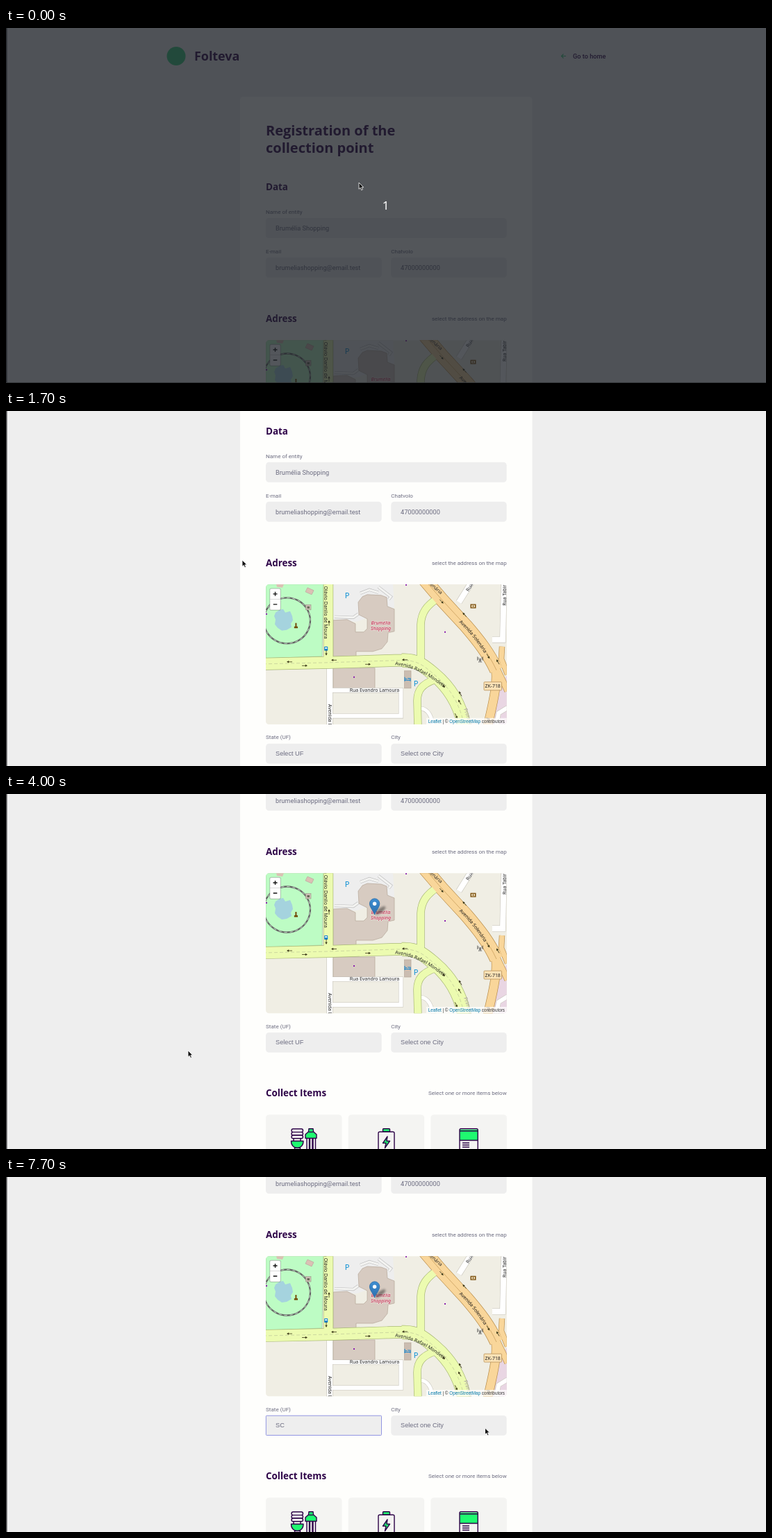
Animation, 1094 px wide and 512 px high, one loop 8 s. Source, as an HTML page:

```html
<!DOCTYPE html>
<html lang="en">
<head>
<meta charset="utf-8">
<title>Collection point form</title>
<style>
html, body { margin: 0; width: 100%; height: 100%; overflow: hidden; background: #eee; }
svg { display: block; width: 1094px; height: 512px; }
text { white-space: pre; }
.h { font-family: "Open Sans", "Noto Sans", sans-serif; font-weight: 700; fill: #2f0549; }
.b { font-family: Roboto, sans-serif; fill: #6c6c80; }
.s { font-family: "Liberation Sans", Arial, sans-serif; fill: #6c6c80; }
.m { font-family: "Noto Sans", sans-serif; fill: #222; font-size: 6.9px; }
</style>
</head>
<body>
<svg id="stage" viewBox="0 0 1094 512" xmlns="http://www.w3.org/2000/svg"></svg>
<script>
const LOOP = 8000, STEP = 100, ROW = 11.63, LIST_TOP = 110, LIST_MAX = 92.5;
const DARK = '#2d0248', GREEN = '#1ffa70';
const STATES = 'Select UF,RO,AC,AM,RR,PA,AP,TO,MA,PI,CE,RN,PB,PE,AL,SE,BA,MG,ES,RJ,SP,PR,SC,RS,MS,MT,GO,DF'.split(',');

// Keyframes: [ms, value...]
const SCROLL = [[700, 0], [1100, 88], [2100, 275], [2500, 336]];
const LIST = [[5200, 0], [5500, 36], [5600, 36], [6100, LIST_MAX]];
const CURSOR = [
  [0, 508, 223], [1000, 508, 224], [1300, 508, 224], [1700, 340, 215], [2100, 259.5, 202],
  [2300, 262, 200], [2500, 408, 193], [2600, 470, 173], [2700, 511, 163], [2800, 544, 165],
  [3000, 531, 175], [3500, 531, 175], [3700, 490, 215], [3900, 330, 325], [4000, 262, 370],
  [4100, 251, 378], [4200, 300, 374], [4400, 405, 357], [4900, 405, 355], [5000, 404.5, 327.5],
  [5100, 405, 303], [5200, 405, 303], [5400, 406, 328], [5600, 406, 322], [5900, 407, 312],
  [6400, 406, 300], [6600, 406, 298], [6700, 406, 279], [6800, 425, 290], [7000, 530, 345],
  [7200, 650, 382], [7400, 689, 387], [7700, 689.5, 362]
];

function at(keys, t) {
  if (t <= keys[0][0]) return keys[0].slice(1);
  for (let i = 1; i < keys.length; i++) {
    const a = keys[i - 1], b = keys[i];
    if (t <= b[0]) {
      const k = (t - a[0]) / (b[0] - a[0]);
      return a.slice(1).map((v, j) => v + (b[j + 1] - v) * k);
    }
  }
  return keys[keys.length - 1].slice(1);
}

const text = (c, x, y, size, s, more = '') =>
  `<text class="${c}" x="${x}" y="${y}" font-size="${size}" ${more}>${s}</text>`;
const rect = (x, y, w, h, fill, r = 0, more = '') =>
  `<rect x="${x}" y="${y}" width="${w}" height="${h}" rx="${r}" fill="${fill}" ${more}/>`;
const path = (d, fill, stroke = 'none', w = 1, more = '') =>
  `<path d="${d}" fill="${fill}" stroke="${stroke}" stroke-width="${w}" ${more}/>`;
const line = (d, stroke, w, more) => path(d, 'none', stroke, w, more);
const road = (d, w, fill, edge) => line(d, edge, w + 1.2) + line(d, fill, w);
const label = (x, y, deg, s, more = '') =>
  `<text class="m" transform="translate(${x} ${y}) rotate(${deg})" ${more}>${s}</text>`;
const arrow = (x, y, deg) => `<g transform="translate(${x} ${y}) rotate(${deg})">` +
  line('M-4 0H2', '#3b3818', 0.8) + path('M4 0L0.8 -1.7V1.7Z', '#3b3818') + '</g>';
const dot = (x, y) => rect(x - 1, y - 1, 2, 2, '#8a1fae');
const right = 'text-anchor="end"', mid = 'text-anchor="middle"';

function header() {
  return '<circle cx="245" cy="40.5" r="13.5" fill="#34cb79"/>' +
    text('h', 271, 47, 17.9, 'Folteva') +
    line('M806 40.5H799.5M802.5 37.5L799.5 40.5L802.5 43.5', '#34cb79', 1.1) +
    text('b', 816, 43.8, 9.2, 'Go to home', 'style="font-weight:500;fill:#2f0549"');
}

function form() {
  return rect(337, 99, 420.5, 1200, '#fefefc', 4.6) +
    text('h', 374, 155.3, 20, 'Registration of the') +
    text('h', 374, 179.6, 20, 'collection point') +
    text('h', 374, 233.8, 13.4, 'Data') +
    text('b', 374, 267.9, 8.05, 'Name of entity') +
    rect(374, 274, 346.7, 29, '#eee', 4.6) +
    text('b', 388, 292, 9.2, 'Brumélia Shopping') +
    text('b', 374, 324.9, 8.05, 'E-mail') +
    text('b', 554.3, 324.9, 8.05, 'Chatvolo') +
    rect(374, 331, 166.7, 29, '#eee', 4.6) + rect(554.3, 331, 166.4, 29, '#eee', 4.6) +
    text('b', 388, 349, 9.2, 'brumeliashopping@email.test') +
    text('b', 568, 349, 9.2, '47000000000') +
    text('h', 374, 423.9, 13.4, 'Adress') +
    text('b', 720.7, 422.3, 8.05, 'select the address on the map', right);
}

function park() {
  const ring = 'M404.5 133.5A33.5 33 0 1 1 404.4 133.5';
  return path('M374 114H457L455 218L374 221Z', '#bdfcc4', '#a5d6a0', 0.8) +
    path('M388 155L394 151L399 150L402 155L409 153L412 160L413 166L410 171L411 176L404 180L397 181L391 177L387 172L388 165L386 160Z', '#a5d3de') +
    line(ring, '#666', 2.3) + line(ring, '#d5eed8', 0.9, 'stroke-dasharray="4 4"') +
    path('M434 119L443 123L440 129L431 125Z', '#dbc1b4', '#b99', 0.6) +
    path('M389 114H400L398 119L390 118Z', '#dbc1b4') +
    rect(431.5, 143.5, 7.5, 7.5, '#cbbcb4', 0, 'stroke="#998" stroke-width=".6"') +
    rect(433.5, 146, 3.4, 3, '#665') +
    path('M416.4 170H418.4V175H420V177.5H414.8V175H416.4Z', '#734a08') + dot(375, 157);
}

function buildings() {
  const wall = '#d7cbc1', edge = '#b5a699';
  const lanes = 'M473 161L500 162L507 157M510 127L523 122L536 126M536 118L554 132L551 136';
  return path('M471 114H557L559 148L505 168H471Z', '#eee') +
    line(lanes, '#bbb', 4.2) + line(lanes, '#f3f3f1', 3) +
    path('M471 166L491 165L503 171V183H515L520 178V164L508 158L507 140L513 132L520 129L540 130L548 133L549 146L559 150V182L550 184L549 197L541 207L528 211H504V219H471Z', wall, edge, 0.7) +
    rect(471, 235, 60, 29, wall, 0, `stroke="${edge}" stroke-width=".7"`) +
    rect(573.5, 239, 9.5, 25, '#cbbdb1', 0, `stroke="${edge}" stroke-width=".7"`) +
    line('M574 248V254M574 252.5H582V254M575 250.5H577M578 250H582V252', '#1285d0', 1.1);
}

function roads() {
  const lime = '#ecfbb0', limeEdge = '#a9b877', sand = '#f9d69a', sandEdge = '#b98f4e', grey = '#c9c6bd';
  const west = 'M370 229L465 227L560 224L580 224', east = 'M570 224C592 223 602 232 616 244C640 264 654 288 660 320';
  const green = [['M464 228V110', 13], ['M597 224V172C598 155 605 145 622 134', 10],
    ['M593 320L592 282C592 266 600 258 616 252', 10], [west, 16.5], [east, 19]];
  const high = 'M598 102L627 136L662 174C680 195 695 214 706 238';
  const orange = [['M714 204L713 222L722 244', 7], ['M704 230L722 268', 8],
    ['M704 230C709 255 701 285 693 320', 12], [high, 18.5]];
  const layer = (list, color, extra) => list.map(([d, w]) => line(d, color, w + extra)).join('');
  return path('M721 246L706 262L703 295L697 318H721Z', '#e9d6e3') +
    road('M466 232V320', 8, '#fff', grey) +
    road('M470 267H568.5V304H470', 6, '#fff', grey) +
    road('M597 293C608 294 612 304 616 320', 5, '#fff', grey) +
    road('M672 108L652 140', 8, '#fff', grey) +
    road('M717 110L715 194H700', 8, '#fff', grey) +
    road('M722 292L709 300L706 318', 6, '#fff', grey) +
    layer(green, limeEdge, 1.4) + layer(orange, sandEdge, 1.4) +
    layer(green, lime, 0) + layer(orange, sand, 0) +
    line(west + east.replace('M', 'L'), '#c5ce9b', 0.8, 'stroke-dasharray="5 3"') +
    line(high, '#c9a05f', 0.8);
}

function mapLabels() {
  const P = (x, y) => text('m', x, y, 11, 'P', mid + ' style="font-size:11px;fill:#0b8fd4"');
  const shop = (y, s) => text('m', 539.5, y, 7, s,
    mid + ' font-style="italic" style="fill:#b8143c;stroke:#f3e8e4;stroke-width:1;paint-order:stroke"');
  return label(457.7, 111, 90, 'a Olávio Danilo de Moura') +
    label(463.7, 287, 90, 'Avenida Lomira') +
    label(719.5, 145, -90, 'Rua Tabir') + label(666, 125, -60, 'Rua Bel') +
    label(609, 114, 42, 'lenária') + label(659, 294, 72, 'Primora', 'style="fill:#a092a2"') +
    label(691, 307, 72, 'Av') +
    '<path id="p1" d="M560 230.5Q600 234 642 274" fill="none"/><path id="p2" d="M652 169C668 183 680 200 698 228" fill="none"/>' +
    '<text class="m"><textPath href="#p1">Avenida Rafael Mondetti</textPath></text>' +
    '<text class="m"><textPath href="#p2">Avenida Solenária</textPath></text>' +
    text('m', 530.5, 269, 7, 'Rua Evandro Lamoura', mid) +
    shop(172.5, 'Brumélia') + shop(180.5, 'Shopping') + P(491, 134) + P(590, 261) +
    rect(688, 255, 25.5, 12, '#fbe2b6', 1, 'stroke="#b99258" stroke-width=".8"') +
    text('m', 700.7, 263.6, 7, 'ZK-718', mid) +
    rect(668.5, 142.7, 8, 6, '#7b4f0d') + rect(670, 144, 5, 3.4, '#f3e6c8') + '<circle cx="672.5" cy="145.7" r="1.1" fill="#7b4f0d"/>' +
    line('M682.5 221V227M680.5 227L682.5 221L684.5 227M680 219.5V223M685 219.5V223M678.7 218.5V224M686.3 218.5V224', '#444', 0.7) +
    rect(458.2, 204, 5, 6, '#1285d0', 0.8) + rect(459.2, 205.2, 3, 1.8, '#fff') +
    [[408, 226, 180], [430, 231.5, 0], [472, 223.5, 180], [521, 229.5, 0], [574, 223, 180], [629, 260, 45],
      [654, 272, 240], [653, 284, 240], [648, 304, 65], [627, 139, 48], [660, 158, 228], [694, 218, 60],
      [708, 226, 240], [465, 170, 270], [461, 213, 90]].map(a => arrow(...a)).join('') +
    dot(576, 115) + dot(632, 183) + dot(501, 248);
}

function controls() {
  return rect(379.7, 120.3, 15.6, 31, '#fff', 2.2, 'stroke="#0003" stroke-width="1.2"') +
    rect(380, 135.3, 15, 0.7, '#ccc') +
    line('M384.5 128H390.5M387.5 125V131M384.7 143H390.3', '#111', 1.3) +
    rect(605, 307, 116, 9.3, '#ffffffb8') +
    text('s', 718, 313.8, 6.35, '<tspan fill="#0078a8">Leaflet</tspan> | © <tspan fill="#0078a8">OpenStreetMap</tspan> contributors', right + ' style="fill:#333"');
}

function pin() {
  return '<g id="pin"><ellipse cx="539" cy="168" rx="9" ry="3.2" transform="rotate(-38 539 168)" fill="#0006" filter="url(#blur)"/>' +
    path('M530.6 174C529 168.5 523.4 163.5 523.4 158A7.2 7.2 0 0 1 537.8 158C537.8 163.5 532.2 168.5 530.6 174Z', 'url(#blue)', '#2b6ca8', 0.8) +
    '<circle cx="530.6" cy="158.2" r="2.7" fill="#fff"/></g>';
}

function items() {
  const pale = '#f4f4f2', ink = `stroke="${DARK}" stroke-width="1.4"`;
  const card = x => rect(x, 462.5, 109.5, 104, pale, 4.6);
  const box = (x, y, w, h, fill, r) => rect(x, y, w, h, fill, r, ink);
  const shape = (d, fill) => path(d, fill, DARK, 1.4, 'stroke-linejoin="round"');
  const lamps = shape('M414 496H424V501H414Z', pale) +
    [483, 487.6, 492.2].map(y => box(411, y, 16.5, 4.6, pale, 2.3)).join('') +
    shape('M410.5 500.5H428C428 507 424 510 419.3 510.5C414.5 510 410.5 507 410.5 500.5Z', GREEN) +
    box(415.5, 510.5, 8, 6, pale, 0) +
    shape('M433 496V518H436.5V496M437.5 496V518H441V496M442 496V518H445.5V496', 'none') +
    shape('M435.5 487L436 482.7H442L442.5 487L447 491V496.5H431V491Z', GREEN) +
    shape('M435.5 487.5H442.5', 'none');
  const battery = box(542.5, 482.7, 10, 4.5, GREEN, 1) + box(536, 487.2, 23, 34, pale, 2) +
    shape('M549 494L542.5 503.5H547L545.5 510.5L552.5 500.5H548Z', GREEN);
  const can = path('M653 484H679V499.5H653Z', GREEN) + box(653, 482.8, 26.2, 38, 'none', 2) +
    shape('M653 486H679M653 499.5H679M657 503.3H667M657 506.3H667M657 509.3H667', 'none');
  return text('h', 374, 436, 13.4, 'Collect Items') +
    text('b', 720.7, 434.3, 8.05, 'Select one or more items below', right) +
    card(374) + card(492.7) + card(611.4) + lamps + battery + can;
}

function dropdown() {
  const rows = STATES.map((s, i) => `<text class="s row" x="388.7" y="${LIST_TOP + i * ROW + 9}" font-size="9.2">${s}</text>`).join('');
  return '<g id="drop">' + rect(374.3, 110.4, 166.2, 233.4, '#eee', 0.5, 'filter="url(#shade)"') +
    `<g clip-path="url(#listClip)"><g id="rows">${rect(374.8, 0, 156.8, ROW, '#4169f0', 0, 'id="mark"')}${rows}</g></g>` +
    rect(532, 111, 8, 232.4, '#ebebeb') + rect(532.5, 119.3, 6.8, 153.5, '#c1c1c1', 0, 'id="thumb"') +
    path('M533.7 116.3L535.8 114L537.9 116.3Z', '#aaa', 'none', 1, 'id="upTip"') +
    path('M533.7 337.5L535.8 339.8L537.9 337.5Z', '#333', 'none', 1, 'id="downTip"') +
    rect(374.3, 110.4, 166.2, 233.4, 'none', 0.5, 'stroke="#8487d6" stroke-width=".9"') + '</g>';
}

function lower() {
  return `<g transform="translate(0 336)"><g clip-path="url(#mapClip)">${rect(374, 114, 347, 203, '#f0eee4')}` +
    park() + buildings() + roads() + mapLabels() + pin() + controls() + '</g>' +
    text('b', 374, 337.5, 8.05, 'State (UF)') + text('b', 554.3, 337.5, 8.05, 'City') +
    rect(374, 344, 166.7, 28.8, '#eee', 4.6) + rect(554.3, 344, 166.4, 28.8, '#eee', 4.6) +
    rect(374.3, 344.2, 166.2, 28.3, '#eee', 1, 'id="focus" stroke="#9295e2" stroke-width="1"') +
    text('s', 388, 361.3, 9.2, 'Select UF', 'id="state"') + text('s', 568, 361.3, 9.2, 'Select one City') +
    items() + dropdown() + '</g>';
}

const stage = document.getElementById('stage');
stage.innerHTML = `<defs>
  <clipPath id="mapClip"><rect x="374" y="114.3" width="346.8" height="202" rx="4.6"/></clipPath>
  <clipPath id="listClip"><rect x="374" y="110.8" width="158" height="232.6"/></clipPath>
  <filter id="blur" x="-50%" y="-100%" width="200%" height="300%"><feGaussianBlur stdDeviation="1.5"/></filter>
  <filter id="shade"><feDropShadow dx="0" dy="1" stdDeviation="2.4" flood-color="#000" flood-opacity=".45"/></filter>
  <linearGradient id="blue" x2="0" y2="1"><stop stop-color="#3f8fd2"/><stop offset="1" stop-color="#2c6fae"/></linearGradient>
</defs>` + rect(0, 0, 1094, 512, '#eee') + `<g id="page">${header() + form() + lower()}</g>` +
  rect(0, 0, 1.6, 512, '#4a4a4c') +
  '<g id="count">' + rect(0, 0, 1094, 512, '#1d2128', 0, 'opacity=".76"') + rect(0, 511, 1094, 1, '#333638') +
  text('m', 546.5, 262.3, 17, '1', mid + ' style="font-size:17px;fill:#fff"') + '</g>' +
  '<g id="cursor">' + path('M0 0V9.3L2.2 7.4L3.7 10.8L5.4 10L3.9 6.8H6.8Z', '#111', '#fff', 0.8, 'id="tip"') +
  path('M-3.5 .5V-3.2a1 1 0 0 1 2 0V-4.5a1 1 0 0 1 2 0V-4a1 1 0 0 1 2 0V-2.8a1 1 0 0 1 2 0V2L3 5.5H-2L-5.3 1a1 1 0 0 1 1.8 -.5Z', '#fff', '#111', 1, 'id="hand"') + '</g>';

const el = id => document.getElementById(id);
const rows = [...document.querySelectorAll('.row')];
const show = (id, on) => el(id).setAttribute('visibility', on ? 'inherit' : 'hidden');
const move = (id, x, y) => el(id).setAttribute('transform', `translate(${x} ${y})`);

function draw(t) {
  const [x, y] = at(CURSOR, t), [list] = at(LIST, t);
  const open = t >= 4500 && t < 6800, hand = t >= 2600 && t <= 3800;
  move('page', 0, -at(SCROLL, t)[0]);
  move('cursor', x, y);
  show('tip', !hand);
  show('hand', hand);
  show('count', t < 100);
  show('pin', t >= 3200);
  show('drop', open);
  show('focus', t >= 4500);
  el('state').textContent = t >= 6800 ? 'SC' : STATES[0];
  if (!open) return;
  // The highlight runs one step ahead of the drawn pointer.
  const hover = at(CURSOR, t + STEP)[1];
  const pick = t < 5000 ? 0 : Math.floor((hover - LIST_TOP + list) / ROW);
  move('rows', 0, -list);
  el('mark').setAttribute('y', LIST_TOP + pick * ROW);
  rows.forEach((r, i) => r.style.fill = i === pick ? '#eee' : '#6c6c80');
  move('thumb', 0, list / LIST_MAX * 61.5);
  el('upTip').setAttribute('fill', list > 0 ? '#333' : '#aaa');
  el('downTip').setAttribute('fill', list < LIST_MAX ? '#333' : '#aaa');
}

const start = performance.now();
function tick() {
  const t = (performance.now() - start) % LOOP;
  draw(Math.floor(t / STEP) * STEP);
  requestAnimationFrame(tick);
}
tick();
</script>
</body>
</html>
```
